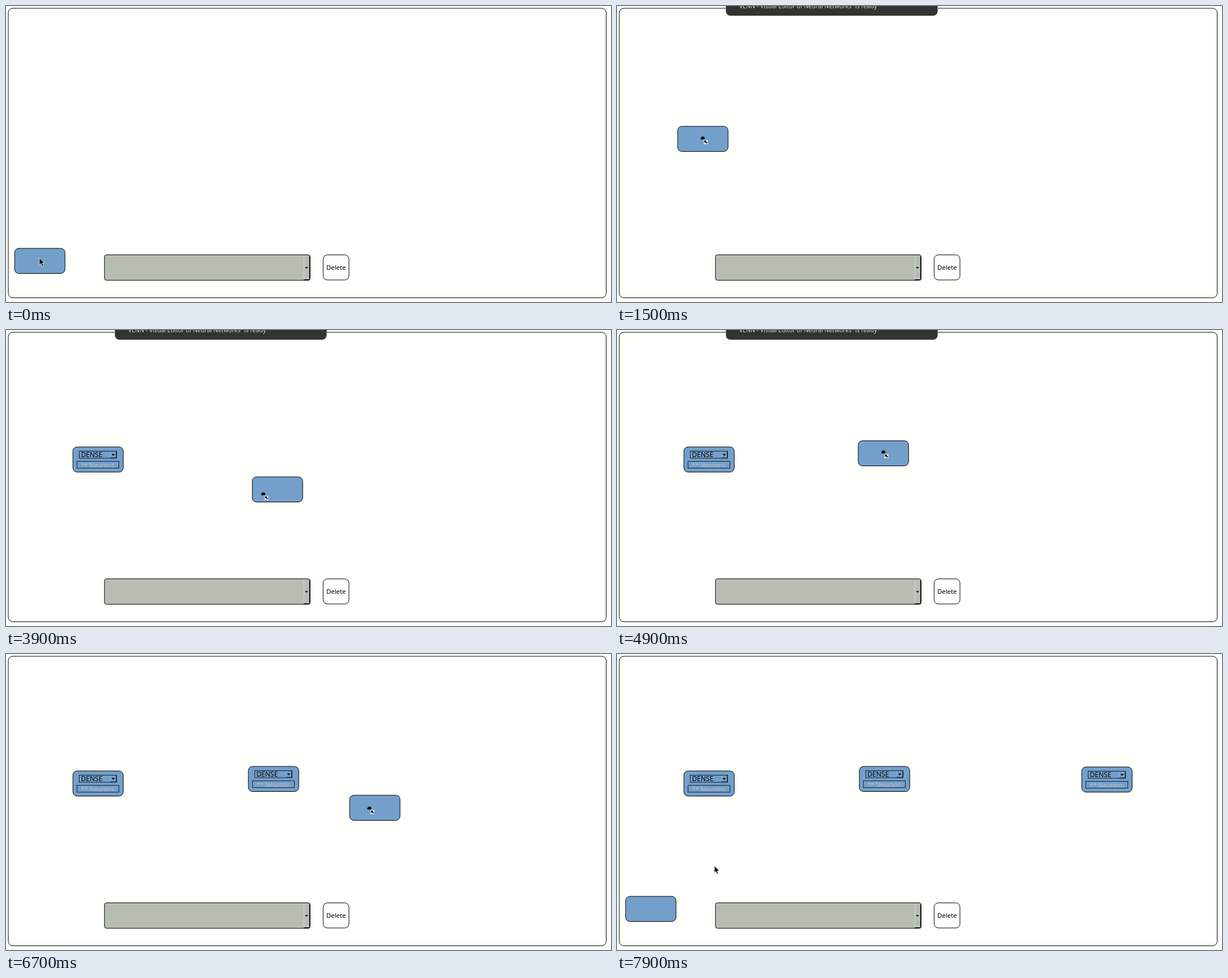
Animation, 1069 px wide and 524 px high, one loop 8000 ms. Source, as an HTML page:

```html
<!DOCTYPE html>
<html lang="en">
<head>
<meta charset="utf-8">
<title>Layer editor</title>
<style>
  html, body { margin: 0; width: 100%; height: 100%; overflow: hidden; background: #fffffc; }
  svg { display: block; font-family: "Noto Sans", sans-serif; }
  .line { fill: none; stroke: #000; }
  .thin { fill: none; stroke: #0c1218; stroke-width: .9; }
  .blue { fill: #739fca; stroke: #000; }
  .hint { fill: #bdc0c1; font-size: 10.8px; text-anchor: middle; }
</style>
</head>
<body>
<svg width="1069" height="524" viewBox="0 0 1069 524">
  <defs>
    <rect id="block" class="blue" x=".2" width="89" height="44.5" rx="7.5"/>
    <g id="layer">
      <use href="#block"/>
      <rect class="thin" x="11.5" y="7.5" width="66" height="12.5"/>
      <path d="M66.5 8V19" stroke="#8fb3d6"/>
      <path class="thin" d="M66 19.2H76.8V8"/>
      <path d="M68.5 12.5h6l-3 3.2z"/>
      <text x="14.5" y="18.3" font-size="12">DENSE</text>
      <rect class="thin" x="7.5" y="25.5" width="74" height="12"/>
      <text class="hint" x="44" y="36.3">** Neurons</text>
    </g>
  </defs>

  <rect class="line" x="4" y="4" width="1056.5" height="512.5" rx="8"/>
  <rect x="174" y="440.5" width="363.3" height="45" rx="3.5" fill="#b7bdb3" stroke="#000"/>
  <path d="M526.5 442V484" stroke="#d5d9d2"/>
  <path class="line" d="M526 484.7H536.5V443" stroke-width="1.3"/>
  <path d="M528 462h6l-3 3.2z" fill="#222"/>
  <rect x="560.4" y="440.6" width="45.6" height="44.4" rx="7.5" fill="#fff" stroke="#000"/>
  <text x="583.2" y="467" font-size="11.3" text-anchor="middle">Delete</text>

  <g id="layers"></g>
  <use id="fresh" href="#block"/>

  <g id="toast">
    <rect x="192" y="-50" width="375" height="68" rx="8" fill="#d4d4cf"/>
    <rect x="192.5" y="-50" width="374" height="67" rx="8" fill="#33342f"/>
    <text x="211.7" y="4.3" font-size="10.6" fill="#d8d8d2">“VENN - Visual Editor of Neural Networks” is ready</text>
  </g>

  <path id="arrow" d="M0 0V12.4L2.9 9.8 5 14.6 7.1 13.7 5 9H9Z" stroke="#fff" stroke-width=".8"/>
  <g id="hand">
    <path d="M-3.5-1V-3H-2V-5H2V-4.2H3.5V0H-2.5Z"/>
    <path d="M2 1H9V3.6L7.6 5 9.6 7 7.6 9 5.6 7 4.2 8.4H2Z" fill="#fff"/>
    <path d="M3 2H7.4L6 3.6 8.4 6.2 7.2 7.4 4.6 5 3 6.6Z"/>
  </g>
</svg>
<script>
const LOOP = 8000, STEP = 100, HAND_LAG = 40;
const $ = id => document.getElementById(id);

// pointer moves: start, end, x, y reached; the pointer rests in between
const moves = [
  [0, 0, 59, 446],
  [800, 1500, 151.5, 235.5],
  [1500, 1800, 163, 229],
  [2300, 2900, 85, 439],
  [3600, 4000, 506, 272],
  [4000, 4600, 470.5, 218.5],
  [4900, 5000, 473, 221],
  [5300, 5600, 112, 419],
  [5700, 6200, 78, 452],
  [6400, 6700, 652, 272],
  [6700, 7300, 866, 222.5],
  [7600, 7700, 309, 345],
  [7800, 7900, 172, 375]
];

// each drag drops a new layer under the pointer
const drags = [[900, 1900], [3700, 5000], [6500, 7400]].map(([from, to]) => {
  const node = document.createElementNS("http://www.w3.org/2000/svg", "use");
  node.setAttribute("href", "#layer");
  $("layers").append(node);
  centre(node, pointer(to));
  return { from, to, node };
});

function place(node, x, y) { node.setAttribute("transform", `translate(${x} ${y})`); }
function centre(node, [x, y]) { place(node, Math.round(x - 45), Math.round(y - 22.5)); }
function show(node, on) { node.style.display = on ? "" : "none"; }
function ramp(t, a, b) { return Math.min(1, Math.max(0, (t - a) / (b - a))); }

function pointer(t) {
  let [, , x, y] = moves[0];
  for (const [a, b, u, v] of moves.slice(1)) {
    const k = 1 - (1 - ramp(t, a, b)) ** 2;
    x += (u - x) * k;
    y += (v - y) * k;
  }
  return [x, y];
}

function draw(now) {
  const t = Math.floor(now % LOOP / STEP) * STEP;
  const drag = drags.find(d => t >= d.from && t < d.to);

  for (const d of drags) show(d.node, t >= d.to);
  if (drag) {
    centre($("fresh"), pointer(t));
    place($("hand"), ...pointer(t - HAND_LAG));
  } else {
    place($("fresh"), 15, 429);
    place($("arrow"), ...pointer(t));
  }
  show($("hand"), drag);
  show($("arrow"), !drag);

  const shown = ramp(t, 1200, 1400) - ramp(t, 5800, 6000);
  place($("toast"), 0, -20 * (1 - shown));
  requestAnimationFrame(draw);
}
requestAnimationFrame(draw);
</script>
</body>
</html>
```
